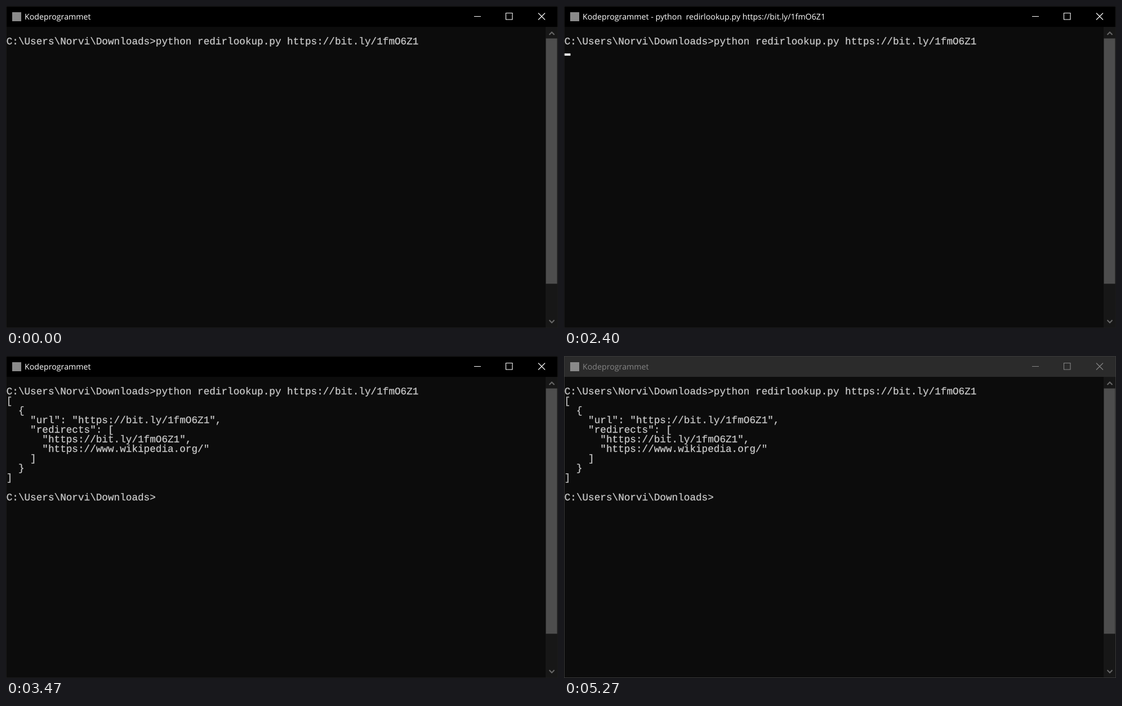
Recreate the animation shown at these times as an HTML page. Size 980 px wide and 571 px high, loop 5.47 s.

```html
<!DOCTYPE html>
<html lang="da">
<head>
<meta charset="utf-8">
<title>Terminal</title>
<style>
  html, body { margin: 0; width: 100%; height: 100%; overflow: hidden; background: #0c0c0c; }
  svg { display: block; }
  text { white-space: pre; text-rendering: geometricPrecision; }
  #title { font: 14.23px "Open Sans", "Noto Sans", sans-serif; fill: #fff; }
  #screen { font: 17.68px "Liberation Mono", monospace; fill: #ccc; stroke: #ccc; stroke-width: .25; }
  #bar { fill: #000; }
  #buttons { fill: none; stroke: #fff; stroke-width: 1.1; }
  #border { fill: none; stroke: #1b1b1b; }
  .arrow { fill: none; stroke: #686868; stroke-width: 2; }
  .inactive #bar { fill: #2b2b2b; }
  .inactive #title { fill: #848484; }
  .inactive #buttons { stroke: #848484; }
  .inactive #border { stroke: #393939; }
</style>
</head>
<body>
<svg id="window" width="980" height="571" viewBox="0 0 980 571">
  <rect width="980" height="571" fill="#0c0c0c"/>
  <rect id="bar" width="980" height="37"/>
  <rect x="11" y="11" width="16" height="16" fill="#8a8a8a"/>
  <text id="title" x="33" y="24.3"></text>
  <path id="buttons" d="M831 18.5h12M887.5 12.5h11.5v11.5h-11.5zM945 12.5l12 12M957 12.5l-12 12"/>
  <rect x="958" y="37" width="21" height="533" fill="#171717"/>
  <rect x="958.5" y="57.5" width="20" height="435" fill="#4d4d4d"/>
  <path class="arrow" d="M964.5 51l4.5-4.5 4.5 4.5M964.5 557l4.5 4.5 4.5-4.5"/>
  <g id="screen"></g>
  <rect id="cursor" width="10.5" height="4" fill="#f2f2f2"/>
  <rect id="border" x=".5" y=".5" width="979" height="570"/>
</svg>
<script>
const LOOP = 5470, LEFT = 0.7, CELL = 10.61, ROW = 17.1, BASELINE = 67.5;
const CURSOR_LEFT = 1, CURSOR_TOP = 67;
const APP = "Kodeprogrammet";
const PROMPT = "C:\\Users\\Norvi\\Downloads>";
const LINK = "https://bit.ly/1fmO6Z1";
const COMMAND = PROMPT + "python redirlookup.py " + LINK;
const report = [{ url: LINK, redirects: [LINK, "https://www.wikipedia.org/"] }];
const OUTPUT = JSON.stringify(report, null, 2).split("\n");

// Start time, visible lines, title, active window
const stages = [
  [0, [COMMAND], APP, true],
  [1400, [COMMAND, ""], `${APP} - python  redirlookup.py ${LINK}`, true],
  [2730, [COMMAND, ...OUTPUT, ""], APP, true],
  [2800, [COMMAND, ...OUTPUT, "", PROMPT], APP, true],
  [5270, [COMMAND, ...OUTPUT, "", PROMPT], APP, false],
];
const cursorOn = [[330, 870], [1400, 1870], [2400, 3470], [4000, 4530], [5070, 5270]];

const byId = id => document.getElementById(id);
const win = byId("window"), title = byId("title"), screen = byId("screen"), cursor = byId("cursor");
let shown;

function showStage(stage) {
  const [, lines, caption, active] = stage;
  title.textContent = caption;
  win.classList.toggle("inactive", !active);
  screen.replaceChildren(...lines.map((line, row) => {
    const text = document.createElementNS(win.namespaceURI, "text");
    text.setAttribute("x", LEFT);
    text.setAttribute("y", BASELINE + row * ROW);
    text.textContent = line;
    return text;
  }));
  const lastRow = lines.length - 1;
  cursor.setAttribute("x", CURSOR_LEFT + lines[lastRow].length * CELL);
  cursor.setAttribute("y", CURSOR_TOP + lastRow * ROW);
  shown = stage;
}

function draw() {
  const time = performance.now() % LOOP;
  const stage = stages.findLast(([start]) => time >= start);
  if (stage !== shown) showStage(stage);
  const visible = cursorOn.some(([from, to]) => time >= from && time < to);
  cursor.setAttribute("visibility", visible ? "visible" : "hidden");
  requestAnimationFrame(draw);
}
draw();
</script>
</body>
</html>
```
